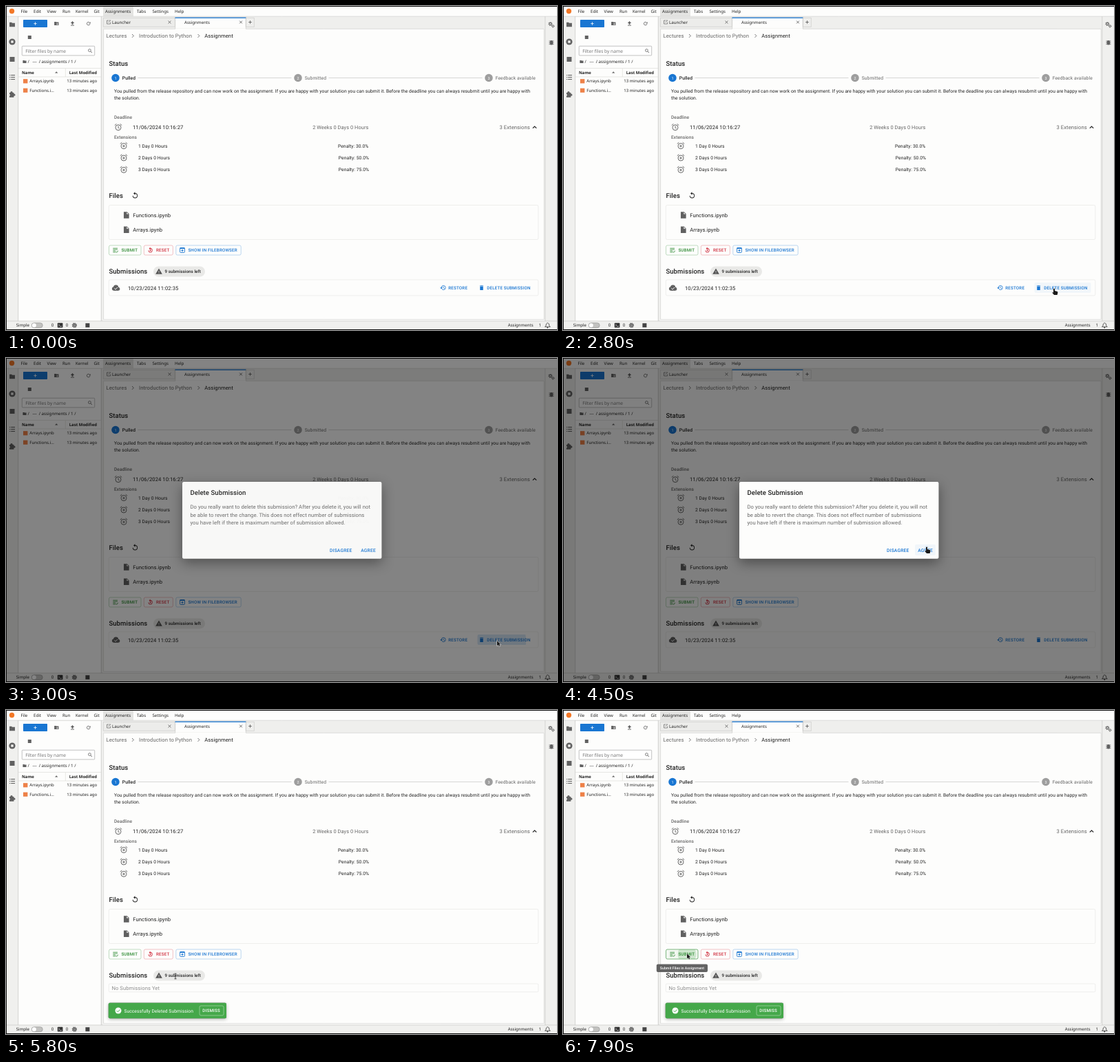
An HTML page with a canvas that plays this animation: 800 by 471 pixels, repeating every 8000 ms.

```html
<!DOCTYPE html>
<html lang="en">
<head>
<meta charset="utf-8">
<title>Delete a submission</title>
<style>
html, body { margin: 0; width: 100%; height: 100%; overflow: hidden; background: #fff; }
canvas { display: block; width: 800px; height: 471px; }
</style>
</head>
<body>
<canvas id="stage"></canvas>
<script>
const W = 800, H = 471, LOOP = 8000, STEP = 100;
const canvas = document.getElementById('stage');
const dpr = window.devicePixelRatio || 1;
canvas.width = Math.round(W * dpr);
canvas.height = Math.round(H * dpr);
const c = canvas.getContext('2d');
c.scale(dpr, dpr);
c.textRendering = 'geometricPrecision';

const INK = '#212121', SOFT = '#666', ICON = '#616161', BLUE = '#1976d2';
const GREEN = '#2e8b33', RED = '#d02c3c', PAGE = '#fdfdfc', EDGE = '#e4e4e2';
const BODY = 7.65, SMALL = 6.69, HEAD = 9.55, BTN = 6.22;

// --- timing ---
const clamp = v => Math.max(0, Math.min(1, v));
const span = (t, from, dur) => clamp((t - from) / dur);
function ease(x) {                       // cubic-bezier(.4, 0, .2, 1)
  let lo = 0, hi = 1;
  for (let i = 0; i < 18; i++) {
    const u = (lo + hi) / 2, v = 1 - u;
    if (1.2 * v * v * u + 0.6 * v * u * u + u * u * u < x) lo = u; else hi = u;
  }
  return 3 * (1 - lo) * lo * lo + lo * lo * lo;
}

// --- drawing helpers ---
function text(s, x, y, px, color = INK, weight = 400, gap = 0.0094, font = 'Roboto', align = 'left') {
  c.font = `${weight} ${px}px "${font}", sans-serif`;
  c.letterSpacing = px * gap + 'px';
  c.textAlign = align;
  c.fillStyle = color;
  c.fillText(s, x, y + px * 0.356);
}
const ui = (s, x, y, px = 6.15, weight = 400, color = INK, align) =>
  text(s, x, y, px, color, weight, 0, 'Noto Sans', align);
const caps = (s, x, y, color, px = BTN) => text(s, x, y, px, color, 500, 0.0286);

function rect(x, y, w, h, color) { c.fillStyle = color; c.fillRect(x, y, w, h); }
function round(x, y, w, h, r, fill, stroke, lw = 0.6) {
  c.beginPath(); c.roundRect(x, y, w, h, r);
  if (fill) { c.fillStyle = fill; c.fill(); }
  if (stroke) { c.strokeStyle = stroke; c.lineWidth = lw; c.stroke(); }
}
function shadow(box, blur, dy, alpha) {  // only outside the box
  c.save();
  c.beginPath(); c.rect(0, 0, W, H); c.roundRect(...box, 2); c.clip('evenodd');
  c.shadowColor = `rgba(0,0,0,${alpha})`;
  c.shadowBlur = blur * dpr;
  c.shadowOffsetY = dy * dpr;
  round(...box, 2, '#000');
  c.restore();
}
function disc(x, y, r, color) {
  c.beginPath(); c.arc(x, y, r, 0, 7); c.fillStyle = color; c.fill();
}
function ring(x, y, r, color, lw = 1, a = 0, b = Math.PI * 2) {
  c.beginPath(); c.arc(x, y, r, a, b);
  c.strokeStyle = color; c.lineWidth = lw; c.stroke();
}
function line(color, lw, ...p) {
  c.beginPath();
  for (let i = 0; i < p.length; i += 2) c.lineTo(p[i], p[i + 1]);
  c.strokeStyle = color; c.lineWidth = lw; c.stroke();
}
function poly(color, ...p) {
  c.beginPath();
  for (let i = 0; i < p.length; i += 2) c.lineTo(p[i], p[i + 1]);
  c.fillStyle = color; c.fill();
}
function glyph(d, x, y, size, color) {   // 24-unit icon centred on x, y
  c.save();
  c.translate(x - size / 2, y - size / 2);
  c.scale(size / 24, size / 24);
  c.fillStyle = color;
  c.fill(new Path2D(d), 'evenodd');
  c.restore();
}
const FOLDER = 'M2 4H10L12 6H22V20H2Z';
const DOC = 'M4 2H14L20 8V22H4ZM13 3.5V9H18.5Z';
const BIN = 'M6 7H18V21H6ZM5 4H8.5L9.5 3H14.5L15.5 4H19V6H5Z';
const WARN = 'M1 21H23L12 2ZM11 10H13V14H11ZM11 16H13V18H11Z';
const REDO = 'M12 5V1L7 6L12 11V7A6 6 0 1 1 6 13H4A8 8 0 1 0 12 5Z';

function cross(x, y, r, color) {
  line(color, 0.9, x - r, y - r, x + r, y + r);
  line(color, 0.9, x - r, y + r, x + r, y - r);
}
function plus(x, y, r, color, lw = 0.9) {
  line(color, lw, x - r, y, x + r, y);
  line(color, lw, x, y - r, x, y + r);
}
function alarm(x, y, add) {
  ring(x, y + 0.4, 4, ICON, 0.95);
  line(ICON, 0.95, x - 5.2, y - 2.8, x - 2.6, y - 5);
  line(ICON, 0.95, x + 5.2, y - 2.8, x + 2.6, y - 5);
  if (add) plus(x, y + 0.4, 1.9, ICON);
  else line(ICON, 0.9, x, y - 2, x, y + 0.7, x + 1.8, y + 1.8);
}
function refresh(x, y, r, color, lw) {
  ring(x, y, r, color, lw, 0.2, 5.4);
  poly(color, x + r + 0.6, y - r - 0.4, x + r + 0.6, y, x + 0.6, y - 0.3);
}
function gear(x, y, r, color) {
  c.setLineDash([r * 0.42, r * 0.36]);
  ring(x, y, r, color, r * 0.5);
  c.setLineDash([]);
  ring(x, y, r * 0.65, color, r * 0.45);
}

// --- static parts ---
function chrome() {
  rect(0, 0, W, H, PAGE);
  rect(1, 16, 17, 442, '#f0f0ee');
  rect(782, 16, 18, 442, '#f0f0ee');
  rect(138, 16, 644, 17, '#efefed');
  rect(138, 16, 3, 442, '#f0f0ee');
  rect(141, 1, 44, 14, '#e4e4e2');
  line('#c6c6c4', 0.7, 1, 15.2, W, 15.2);
  line('#c9c9c7', 0.7, 17.7, 15, 17.7, 458);
  line('#c4c4c2', 0.7, 138.3, 15, 138.3, 458);
  line('#c9c9c7', 0.7, 782.8, 15, 782.8, 458);

  disc(8.5, 7.5, 3.7, '#f37726');
  const menu = { File: 21.5, Edit: 40, View: 59.5, Run: 82, Kernel: 101, Git: 127.5,
    Assignments: 144, Tabs: 190, Settings: 212.5, Help: 245 };
  for (const name in menu) ui(name, menu[name], 7.8);

  // activity bars
  glyph(FOLDER, 9, 27, 9.5, ICON);
  disc(9, 52, 4.6, ICON);
  rect(7.3, 50.3, 3.4, 3.4, '#f0f0ee');
  rect(5.5, 74, 7, 7, ICON);
  for (const y of [100.5, 103.5, 106.5]) {
    rect(5, y - 0.5, 1.2, 1.1, ICON);
    rect(7.2, y - 0.5, 5.8, 1.1, ICON);
  }
  rect(5, 126, 6.4, 6.8, ICON);
  disc(8, 125.6, 1.6, ICON);
  disc(11.8, 129.2, 1.6, ICON);
  disc(5, 129.4, 1.1, '#f0f0ee');
  gear(790.4, 26, 2.4, ICON);
  gear(794.2, 29.3, 1.8, ICON);
  round(789.7, 50, 4.4, 6.6, 2.2, ICON);
  for (const y of [51, 53.3, 55.6]) line(ICON, 0.8, 788.4, y, 795.4, y);

  // file panel
  round(25, 20, 35, 11, 0.8, BLUE);
  plus(42.5, 25.6, 2.2, '#fff', 0.8);
  glyph(FOLDER, 73.3, 25.5, 7.6, ICON);
  plus(74.4, 26.2, 1.4, '#fff', 0.6);
  poly(ICON, 96.5, 22, 99.2, 25, 97.4, 25, 97.4, 27, 95.6, 27, 95.6, 25, 93.8, 25);
  rect(94, 27.7, 5, 0.9, ICON);
  refresh(119.7, 25.6, 2.3, ICON, 0.8);
  rect(31.8, 43, 5, 5, ICON);
  round(23.3, 58.3, 105.4, 13.6, 0.8, '#fff', '#aaa', 0.7);
  ui('Filter files by name', 28.2, 65.3, 6.65, 400, '#757575');
  ring(121.4, 64.5, 1.9, ICON, 0.8);
  line(ICON, 0.9, 122.8, 65.9, 124.9, 68);
  glyph(FOLDER, 27, 81, 6.2, ICON);
  ui('/', 31.6, 81);
  for (const x of [39.5, 41.5, 43.5]) disc(x, 81.4, 0.5, INK);
  ui('/ assignments / 1 /', 47.7, 81, 6.2);
  line('#d8d8d6', 0.6, 18, 90.5, 138, 90.5);
  line('#d8d8d6', 0.6, 18, 103, 138, 103);
  line('#d8d8d6', 0.6, 86.3, 91, 86.3, 103);
  ui('Name', 23, 97, 5.95, 600);
  poly(ICON, 71, 97.6, 73.2, 95.2, 75.4, 97.6);
  ui('Last Modified', 132, 97, 5.95, 600, INK, 'right');
  [['Arrays.ipynb', 109.2], ['Functions.i…', 122.6]].forEach(([name, y]) => {
    rect(25, y - 3, 6.4, 6.2, '#ee8148');
    ui(name, 34.3, y, 6.05);
    ui('13 minutes ago', 132.2, y, 6.05, 400, INK, 'right');
  });

  // tabs
  rect(141, 17, 104.5, 13, '#ececea');
  round(141.3, 17.3, 104, 13, 0, null, '#c4c4c2');
  round(245.7, 16.8, 102.6, 16.4, 0, PAGE, '#c4c4c2');
  rect(245.4, 16.5, 103.2, 1.3, BLUE);
  round(348.3, 17.3, 12, 13, 0, null, '#c4c4c2');
  line(ICON, 0.7, 149, 21, 146.6, 21, 146.6, 26, 151.6, 26, 151.6, 23.6);
  line(ICON, 0.7, 148.6, 24, 151.7, 20.9, 149.8, 20.9);
  ui('Launcher', 154, 23.6);
  ui('Assignments', 259, 23.6, 6.1);
  cross(237.5, 23.5, 1.9, ICON);
  cross(341, 23.5, 1.9, ICON);
  plus(354.5, 23.5, 2.3, ICON);
  rect(141.5, 33, 640, 423, PAGE);
  round(141.6, 33.3, 639.6, 422.5, 0, null, '#cfcfcd', 0.7);
  rect(246, 32.5, 102, 1.5, PAGE);

  // status bar
  rect(1, 458, W - 1, 12, '#f0f0ee');
  line('#c6c6c4', 0.7, 1, 458, W, 458);
  ui('Simple', 14.8, 464.3, 6.05);
  round(37.2, 460.7, 16, 7, 3.5, '#c2c2c0', '#8c8c8c', 0.6);
  disc(40.8, 464.2, 3, '#fff');
  ui('0', 65.8, 464.3);
  round(74.8, 460.8, 7.6, 6.8, 0.8, '#333');
  line('#fff', 0.7, 76.2, 462.6, 77.7, 464, 76.2, 465.4);
  line('#fff', 0.7, 78.4, 465.7, 80.8, 465.7);
  ui('0', 86.8, 464.3);
  gear(99.4, 464.2, 3, ICON);
  disc(99.4, 464.2, 1, ICON);
  rect(115.4, 461.2, 6, 6, '#444');
  ui('Assignments', 728.8, 464.3, 6.1);
  ui('1', 773.4, 464.3, 6.1);
  c.beginPath();
  c.moveTo(782.5, 466.3); c.lineTo(784, 464.8);
  c.bezierCurveTo(783.8, 459.5, 789, 459.5, 788.7, 464.8);
  c.lineTo(790.2, 466.3); c.closePath();
  c.strokeStyle = '#333'; c.lineWidth = 0.8; c.stroke();
  disc(786.3, 467.6, 0.9, '#333');

  rect(0, 0, W, 1, '#111');
  rect(0, 0, 1, H, '#111');
  rect(0, 470, W, 1, '#111');
}

function step(n, x, label, on) {
  disc(x, 104.5, 5.75, on ? BLUE : '#9e9e9e');
  text(n, x, 104.6, 5.4, '#fff', 400, 0, 'Roboto', 'center');
  text(label, x + 9.8, 104.6, SMALL, on ? INK : SOFT, on ? 500 : 400, 0.0107);
}
function assignment() {
  text('Lectures', 145.5, 43.3, BODY, SOFT);
  text('Introduction to Python', 193, 43.3, BODY, SOFT);
  text('Assignment', 288.3, 43.3, BODY);
  for (const x of [183, 278.5]) line(SOFT, 0.9, x, 41, x + 2.4, 43.4, x, 45.8);

  text('Status', 149.4, 83.7, HEAD, INK, 500, 0.0075);
  step('1', 159, 'Pulled', true);
  step('2', 424, 'Submitted');
  step('3', 701, 'Feedback available');
  line('#bdbdbd', 0.6, 191.5, 104.5, 414.5, 104.5);
  line('#bdbdbd', 0.6, 468.5, 104.5, 691.5, 104.5);
  text('You pulled from the release repository and can now work on the assignment. If you are happy with your solution you can submit it. Before the deadline you can always resubmit until you are happy with',
    157, 123.6, SMALL, INK, 400, 0.0107);
  text('the solution.', 157, 133.2, SMALL, INK, 400, 0.0107);

  text('Deadline', 157, 161.2, 6.6, SOFT, 500, 0.0071);
  alarm(163, 176.3);
  text('11/06/2024 10:16:27', 184, 176.3, BODY);
  text('2 Weeks 0 Days 0 Hours', 445.2, 176.3, 7.42, SOFT);
  text('3 Extensions', 716.5, 176.3, BODY, SOFT);
  line(INK, 1.2, 764.8, 177.7, 767.5, 175, 770.2, 177.7);
  text('Extensions', 157, 191, 6.6, SOFT, 500, 0.0071);
  [['1 Day', '30'], ['2 Days', '50'], ['3 Days', '75']].forEach(([d, p], i) => {
    const y = 203.2 + i * 17.4;
    alarm(171, y, true);
    text(d + ' 0 Hours', 192, y, SMALL, INK, 400, 0.0107);
    text(`Penalty: ${p}.0%`, 482 + (i ? 0.8 : 0), y, SMALL, INK, 400, 0.0107);
  });

  text('Files', 149.4, 275.7, HEAD, INK, 500, 0.0075);
  glyph(REDO, 187.4, 275.3, 11, INK);
  round(149.3, 289.5, 623.6, 50, 2, null, EDGE);
  ['Functions.ipynb', 'Arrays.ipynb'].forEach((name, i) => {
    const y = 304 + i * 21.3;
    glyph(DOC, 174.8, y, 11.5, ICON);
    text(name, 184.3, y, BODY);
  });

  text('Submissions', 149.4, 385.7, HEAD, INK, 500, 0.0075);
  round(214, 378.6, 75, 14.8, 7.4, '#e9e9e7');
  glyph(WARN, 222, 385.8, 10.6, '#555');
  text('9 submissions left', 230.5, 386.2, 6.25, INK, 500, 0.008);
}

// --- interactive parts ---
function ripple(t, b, x, y, down, up, color) {
  const grow = ease(span(t, down, 550));
  const r = grow * Math.max(x - b[0], b[0] + b[2] - x);
  const a = (0.1 + 0.2 * grow) * (1 - ease(span(t, up, 550)));
  if (t < down || a <= 0) return;
  c.save();
  c.beginPath(); c.roundRect(...b, 2); c.clip();
  c.globalAlpha *= a;
  disc(x, y, r, color);
  c.restore();
}
const inside = (p, b) => p.x > b[0] && p.x < b[0] + b[2] && p.y > b[1] && p.y < b[1] + b[3];
function hover(p, b, color) {
  if (!inside(p, b)) return;
  c.save();
  c.globalAlpha *= 0.05;
  round(...b, 2, color);
  c.restore();
}
const SUBMIT = [149.5, 348, 46.5, 14], RESET = [200.3, 348, 42, 14], SHOW = [246.8, 348, 94.4, 14];
const DELETE = [684.5, 402, 82, 15], AGREE = [511, 271, 30, 16];

function buttons(t, p) {
  hover(p, SUBMIT, GREEN);
  ripple(t, SUBMIT, 180, 355, 7720, 7900, '#2e9b33');
  round(...SUBMIT, 2, null, inside(p, SUBMIT) ? GREEN : '#98c69b');
  round(...RESET, 2, null, '#e8989f');
  round(...SHOW, 2, null, '#8fbce8');
  for (let i = 0; i < 4; i++) line(GREEN, 0.8, 155.3, 352.2 + i * 1.9, i > 1 ? 159 : 162, 352.2 + i * 1.9);
  line(GREEN, 0.9, 159.4, 357, 160.6, 358.3, 162.8, 355.8);
  caps('SUBMIT', 167.4, 355.2, GREEN);
  glyph(REDO, 209.6, 354.8, 9.2, RED);
  disc(209.6, 355.2, 1, RED);
  caps('RESET', 218, 355.2, RED);
  round(252.6, 351.6, 6.8, 6.8, 0.8, null, BLUE, 0.9);
  rect(252.6, 351.2, 6.8, 1.7, BLUE);
  poly(BLUE, 256, 353.8, 258, 355.7, 254, 355.7);
  rect(255.5, 355.5, 1, 1.7, BLUE);
  caps('SHOW IN FILEBROWSER', 264.4, 355.2, BLUE);
}
function submission(t, p) {
  if (t >= 4800) {
    round(149.3, 398, 623.6, 11.8, 1.5, null, EDGE);
    text('No Submissions Yet', 153.4, 404.2, BODY, '#8f8f8f');
    return;
  }
  round(149.3, 398, 623.6, 23, 2, null, EDGE);
  disc(156.7, 411, 2.8, ICON); disc(159.6, 409, 3.6, ICON);
  disc(162.8, 411.3, 2.5, ICON); rect(156.7, 410.5, 6, 3.3, ICON);
  line('#fff', 0.9, 157.3, 410.3, 159, 412, 162, 408.9);
  text('10/23/2024 11:02:35', 177, 409.8, BODY);
  hover(p, DELETE, BLUE);
  ripple(t, DELETE, 713, 411, 2720, 2850, BLUE);
  ring(635.2, 409.5, 3, BLUE, 0.85, -Math.PI, 2.4);
  poly(BLUE, 630.3, 409.3, 634, 409.3, 632.1, 411.5);
  line(BLUE, 0.7, 635.2, 407.7, 635.2, 409.8, 636.8, 410.8);
  caps('RESTORE', 642.3, 409.8, BLUE);
  glyph(BIN, 690.5, 409.5, 9, BLUE);
  caps('DELETE SUBMISSION', 698.2, 409.8, BLUE);
}
function dialog(t, p) {
  const a = t < 4540 ? ease(span(t, 2830, 225)) : 1 - ease(span(t, 4540, 195));
  if (!a) return;
  const box = [256, 180, 289.5, 111.8];
  rect(0, 0, W, H, `rgba(0,0,0,${0.5 * a})`);
  c.save();
  c.globalAlpha = a;
  shadow(box, 18, 6, 0.4);
  round(...box, 2, PAGE);
  text('Delete Submission', 267.4, 195.2, HEAD, INK, 500, 0.0075);
  ['Do you really want to delete this submission? After you delete it, you will not',
   'be able to revert the change. This does not effect number of submissions',
   'you have left if there is maximum number of submission allowed.'
  ].forEach((s, i) => text(s, 267.4, 216.3 + i * 11.5, BODY, SOFT));
  hover(p, AGREE, BLUE);
  ripple(t, AGREE, 528, 276, 4380, 4530, BLUE);
  caps('DISAGREE', 470, 279.2, BLUE, SMALL);
  caps('AGREE', 515.3, 279.2, BLUE, SMALL);
  c.restore();
}
function snackbar(t) {
  const k = ease(span(t, 4940, 225));
  if (!k) return;
  const box = [148.8, 425.8, 171.2, 22.4];
  c.save();
  c.globalAlpha = k;
  c.translate(234.5, 437);
  c.scale(0.75 + 0.25 * k, 0.5625 + 0.4375 * k);
  c.translate(-234.5, -437);
  shadow(box, 5, 1.5, 0.28);
  round(...box, 2, '#45a84a');
  disc(163, 437, 4.5, '#fff');
  line('#45a84a', 1, 160.7, 437.1, 162.4, 438.8, 165.5, 435.6);
  text('Successfully Deleted Submission', 171.4, 437.2, SMALL, '#fff', 400, 0.0107);
  round(281, 430, 35, 14, 2, null, '#b9e0bb');
  caps('DISMISS', 285.3, 437.2, '#fff');
  c.restore();
}
function tooltip(t) {
  const k = ease(span(t, 6850, 150));
  if (!k) return;
  c.save();
  c.globalAlpha = k;
  round(135.8, 369.5, 74.2, 11.5, 2, 'rgba(90,90,90,.94)');
  text('Submit Files in Assignment', 172.9, 375.4, 5.26, '#fff', 500, 0, 'Roboto', 'center');
  c.restore();
}

// --- pointer: time, x, y ---
const PATH = [
  [500, 300, 470], [1300, 264, 442], [1500, 262, 441.5], [1750, 262, 441.5],
  [1900, 649, 387], [2050, 649, 387], [2600, 713, 411], [3650, 713, 411],
  [4200, 528, 275], [4950, 528, 275], [5800, 246, 387], [6000, 238, 384],
  [6250, 238, 384], [7000, 180, 354]
];
function pointer(t) {
  if (t < PATH[0][0]) return { x: -50, y: -50 };
  const i = PATH.findIndex(k => k[0] > t);
  if (i < 0) return { x: 180, y: 354 };
  const [t0, x0, y0] = PATH[i - 1], [t1, x1, y1] = PATH[i];
  const u = span(t, t0, t1 - t0), k = u * u * (3 - 2 * u);
  return { x: x0 + (x1 - x0) * k, y: y0 + (y1 - y0) * k };
}
const isModal = t => t >= 2900 && t < 4700;
const HAND = new Path2D('M-1 0Q0-1 1 0V3L4.6 4Q5.6 4.5 5.4 6L4.6 9H0L-2.8 5.8Q-2.6 4.6-1 5.6Z');
const ARROW = new Path2D('M0 0V7.6L1.8 6L3 8.6L4.2 8.1L3.1 5.6H5.4Z');
function cursor(p, t) {
  c.save();
  c.translate(p.x, p.y);
  const hot = isModal(t) ? inside(p, AGREE)
    : t < 4800 ? inside(p, DELETE) : t < 7900 && inside(p, SUBMIT);
  if (!hot && inside(p, [214, 378, 75, 16])) {
    line('#222', 0.8, 0, -3.6, 0, 3.6);
    line('#222', 0.8, -1.5, -3.8, 1.5, -3.8);
    line('#222', 0.8, -1.5, 3.8, 1.5, 3.8);
  } else {
    const shape = hot ? HAND : ARROW;
    c.strokeStyle = '#fff'; c.lineWidth = 0.9; c.stroke(shape);
    c.fillStyle = '#1a1a1a'; c.fill(shape);
  }
  c.restore();
}

function draw(t) {
  const p = pointer(t);
  const under = isModal(t) ? { x: -50, y: -50 } : p;
  chrome();
  assignment();
  buttons(t, under);
  submission(t, under);
  snackbar(t);
  tooltip(t);
  dialog(t, p);
  cursor(p, t);
}

const start = performance.now();
let last = -1;
function frame() {
  const t = Math.floor(((performance.now() - start) % LOOP) / STEP) * STEP;
  if (t !== last) draw(last = t);
  requestAnimationFrame(frame);
}
frame();
</script>
</body>
</html>
```
